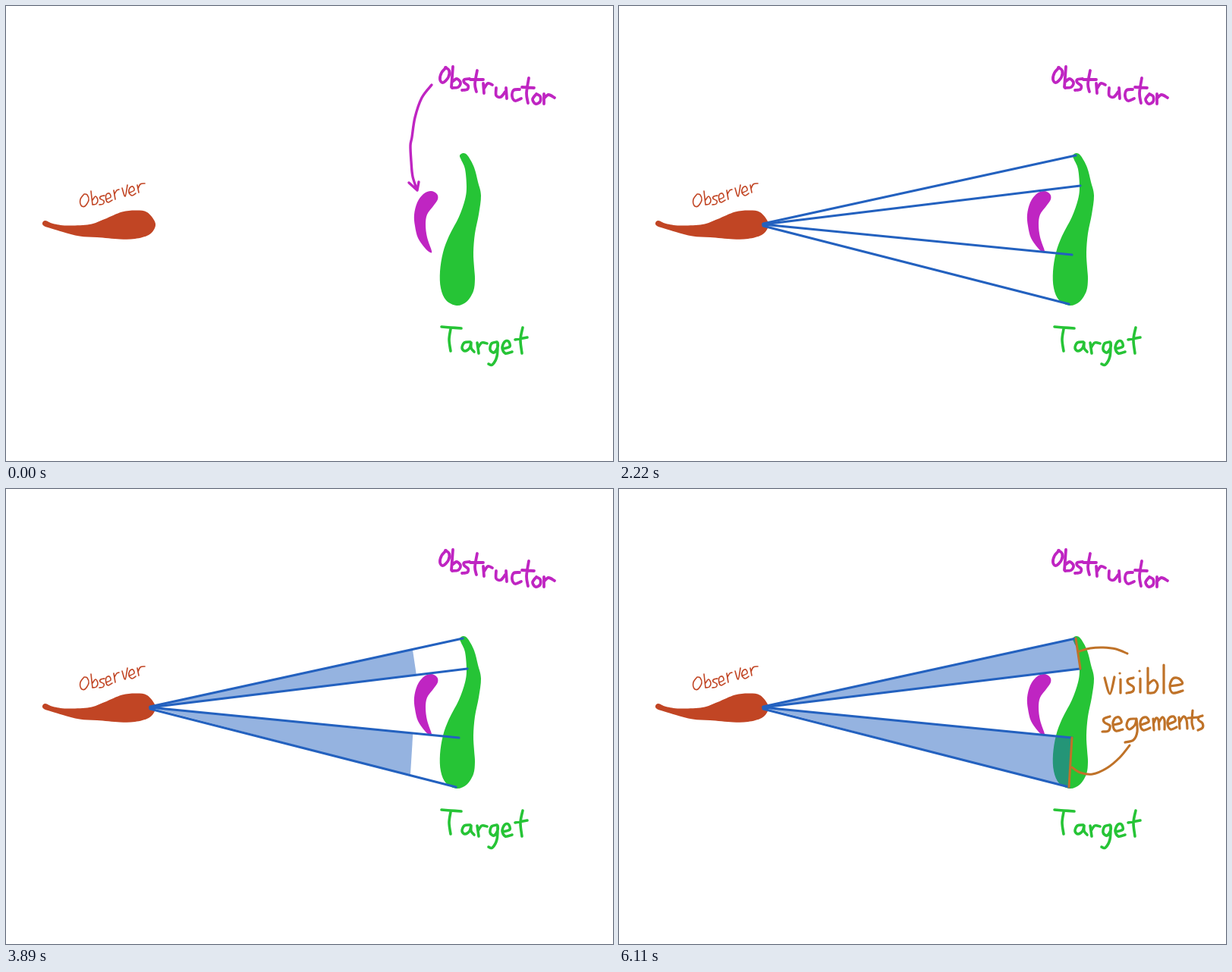
These frames come from a looping animation (800x600 px, 6.22 s). An HTML page with a canvas:

```html
<!DOCTYPE html>
<html lang="en">
<head>
<meta charset="utf-8">
<title>Visible segments</title>
<style>
html, body { margin: 0; width: 100%; height: 100%; overflow: hidden; background: #fff; }
canvas { display: block; }
</style>
</head>
<body>
<canvas id="stage" width="800" height="600"></canvas>
<script>
const ctx = document.getElementById('stage').getContext('2d');
const LOOP = 6220;
const RED = '#c14524', PURPLE = '#bf25c2', GREEN = '#26c436', BLUE = '#2361bf', ORANGE = '#bf7228';
const EYE = [190, 288];

// Ends of the two visible parts of the green body, with the pace of each wedge.
const wedges = [
  { a: [602, 197], b: [608, 237], pace: 1.03 },
  { a: [597, 328], b: [593, 393], pace: 0.95 }
];

// Smooth path through points; "/" starts a new stroke.
function curve(text, closed = false) {
  const path = new Path2D();
  for (const part of text.split('/')) {
    const p = part.trim().split(/\s+/).map(s => s.split(',').map(Number));
    const n = p.length;
    const at = i => closed ? p[(i + n) % n] : p[Math.max(0, Math.min(n - 1, i))];
    path.moveTo(...p[0]);
    if (n === 1) path.lineTo(p[0][0] + 0.1, p[0][1]);
    for (let i = 0; i < (closed ? n : n - 1); i++) {
      const [p0, p1, p2, p3] = [at(i - 1), at(i), at(i + 1), at(i + 2)];
      path.bezierCurveTo(
        p1[0] + (p2[0] - p0[0]) / 6, p1[1] + (p2[1] - p0[1]) / 6,
        p2[0] - (p3[0] - p1[0]) / 6, p2[1] - (p3[1] - p1[1]) / 6,
        p2[0], p2[1]);
    }
    if (closed) path.closePath();
  }
  return path;
}

const bodies = [
  [RED, curve(`48,286 52,283 62,287 80,289.5 110,288 130,281 153,271.5 172,269.5 186,272
    196,284 196,293 188,302 170,307 150,307.5 120,305 97,303.5 75,298 60,293.5 50,290`, true)],
  [GREEN, curve(`603,194 609,198 617,213 622,232 626,250 623,275 618,300 616,325 617,345
    618,360 616,376 607,390 594,395 580,388 573,372 572,350 576,325 584,303 597,278
    605,255 607,238 605,215 600,203 598,197`, true)],
  [PURPLE, curve(`560,244 568,248 569,255 563,264 555,275 553,288 555,305 561,323 559,325
    552,319 543,306 539,290 538,275 542,259 550,248`, true)]
];

const redWord = curve(`103,248 98,255 99,263 104,264 109,256 107,249 103,248
  / 112,244 114,262 / 114,256 118,251 121,256 119,261 114,262
  / 130,250 125,251 124,254 129,257 128,261 123,262
  / 132,255 138,252 136,247 132,249 132,256 135,259 140,256
  / 142,243 144,255 / 143,248 146,243 149,242
  / 153,240 157,251 160,236
  / 163,246 169,243 167,238 163,240 162,246 166,250 171,247
  / 173,236 175,246 / 174,241 177,235 183,234`);

const purpleWord = curve(`580,81 574,88 572,97 576,101 583,94 584,85 579,81
  / 589,80 587,107 / 588,100 594,96 599,101 596,107 588,108
  / 611,96 604,97 604,101 609,105 608,110 601,111
  / 621,85 618,103 620,113 / 612,97 629,97
  / 629,102 630,115 / 630,109 635,102 641,104
  / 646,108 646,118 652,120 658,113 / 659,108 660,122
  / 677,110 669,111 667,119 671,125 679,122
  / 689,95 686,115 688,128 / 680,107 696,108
  / 699,116 694,123 698,129 704,126 704,119 699,116
  / 709,116 709,129 / 709,122 715,117 723,121`);

const greenWord = curve(`574,423 586,424 600,425 / 586,426 584,440 586,455
  / 612,443 604,444 601,451 605,455 611,451 613,444 / 613,444 613,451 617,456
  / 621,444 623,458 / 622,451 627,444 634,445
  / 647,443 640,445 638,453 643,457 648,450 648,444 / 648,444 647,462 641,473 636,472
  / 655,452 664,449 662,442 657,443 654,451 658,458 667,456
  / 681,424 678,440 680,458 / 671,440 687,437`);

const visible = curve(`640,249 647,270 653,248 / 661,251 661,269 / 660,243
  / 678,249 671,251 671,256 678,261 677,267 669,269
  / 687,250 687,268 / 686,240
  / 697,236 697,268 / 697,258 705,252 710,259 706,268 697,269
  / 718,232 718,269
  / 726,260 742,257 738,250 730,250 726,260 730,269 743,266`);

const segments = curve(`647,300 639,303 640,308 647,312 645,319 637,320
  / 652,311 662,308 659,301 653,303 651,312 655,319 664,317
  / 680,303 672,304 669,312 673,317 680,311 682,303 / 682,303 683,320 678,331 667,334
  / 688,311 698,307 695,301 689,303 687,311 691,318 700,315
  / 704,303 705,318 / 705,308 708,302 711,305 712,317 / 712,307 716,301 719,305 719,317
  / 724,310 733,306 731,300 725,302 723,310 727,317 735,314
  / 738,301 739,316 / 739,307 744,300 748,305 749,316
  / 756,292 755,308 757,316 / 750,302 763,301
  / 769,299 764,301 764,305 769,309 769,315 763,318`);

const arrow = curve(`561,104 548,121 539,147 535,173 533,184 534,205 536,225 542,243
  / 531,233 542,243 / 544,232 542,243`);
const leaders = curve(`607,214 621,210 638,209 655,211 670,217
  / 597,367 608,374 624,376 643,368 660,354 673,338`);

function stroke(color, width, path) {
  ctx.strokeStyle = color;
  ctx.lineWidth = width;
  ctx.stroke(path);
}

function line(color, width, from, to) {
  const path = new Path2D();
  path.moveTo(...from);
  path.lineTo(...to);
  stroke(color, width, path);
}

const mix = (p, q, f) => [p[0] + (q[0] - p[0]) * f, p[1] + (q[1] - p[1]) * f];
const part = (k, start, end) => Math.max(0, Math.min(1, (k - start) / (end - start)));

function drawWedge({ a, b, pace }, f) {
  const p = mix(EYE, a, f ** pace), q = mix(EYE, b, f ** pace);
  ctx.globalAlpha = 0.48;
  ctx.fillStyle = BLUE;
  ctx.beginPath();
  ctx.moveTo(...EYE);
  ctx.lineTo(...p);
  ctx.lineTo(...q);
  ctx.fill();
  ctx.globalAlpha = 1;
}

function draw(t) {
  // Eight drawings a second, shown on a nine-per-second clock.
  const tick = Math.floor((t + 5) / (1000 / 9));
  const k = Math.floor((8 * tick + 5) / 9);
  const rays = part(k, 13, 18);
  const fill = part(k, 25.6, 32);
  const edge = part(k, 35, 37);

  ctx.fillStyle = '#fff';
  ctx.fillRect(0, 0, 800, 600);
  for (const [color, path] of bodies) {
    ctx.fillStyle = color;
    ctx.fill(path);
  }
  stroke(RED, 1.6, redWord);
  stroke(PURPLE, 3.8, purpleWord);
  stroke(GREEN, 3.6, greenWord);
  if (k < 9) stroke(PURPLE, 3.4, arrow);

  if (fill > 0) wedges.forEach(w => drawWedge(w, fill));
  if (rays > 0) {
    wedges.forEach((w, i) => {
      line(BLUE, 3.2, [EYE[0], EYE[1] - 1 + i], mix(EYE, w.a, rays));
      line(BLUE, 3.2, [EYE[0], EYE[1] + 2 * i], mix(EYE, w.b, rays));
    });
  }
  if (edge > 0) wedges.forEach(w => line(ORANGE, 3, w.a, mix(w.a, w.b, edge)));
  if (k >= 40) {
    stroke(ORANGE, 3, leaders);
    stroke(ORANGE, 3.2, visible);
    stroke(ORANGE, 3.2, segments);
  }
}

ctx.lineCap = ctx.lineJoin = 'round';
function loop() {
  draw(performance.now() % LOOP);
  requestAnimationFrame(loop);
}
loop();
</script>
</body>
</html>
```
